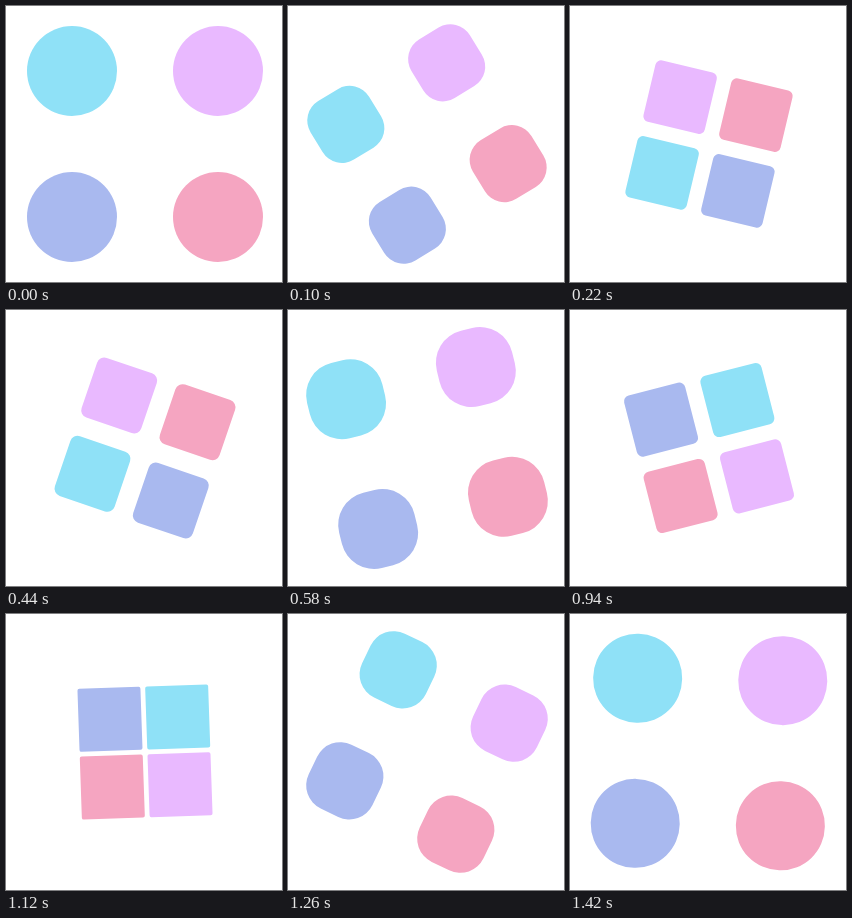
An HTML page with a canvas for the animation above (1.44 s loop, 276 by 276 pixels).

```html
<!DOCTYPE html>
<html lang="en">
<head>
<meta charset="utf-8">
<title>Four shapes loader</title>
<style>
  html, body { margin: 0; width: 100%; height: 100%; overflow: hidden; background: #fff; }
  canvas { display: block; }
</style>
</head>
<body>
<canvas id="stage" width="276" height="276"></canvas>
<script>
const ctx = document.getElementById('stage').getContext('2d');
const LOOP = 1440, STEP = 20, DELAY = 19, SWING = 725;
const shapes = [
  { x: -1, y: -1, color: '#8fe1f7' },
  { x: 1, y: -1, color: '#e9b9ff' },
  { x: -1, y: 1, color: '#a9b9ef' },
  { x: 1, y: 1, color: '#f5a5c1' },
];

const bezier = (a, b, u) => 3 * a * u * (1 - u) ** 2 + 3 * b * u * u * (1 - u) + u ** 3;

// cubic-bezier(.25, .1, .25, 1)
function ease(x) {
  let lo = 0, hi = 1;
  for (let i = 0; i < 30; i++) {
    const mid = (lo + hi) / 2;
    if (bezier(0.25, 0.25, mid) < x) lo = mid; else hi = mid;
  }
  return bezier(0.1, 1, lo);
}

function draw(time) {
  const t = Math.floor((time % LOOP) / STEP) * STEP;
  const phase = Math.max(0, (t - DELAY) / SWING);
  const half = (phase % 1) * 2;
  const fold = half < 1 ? ease(half) : 1 - ease(half - 1);
  const turn = phase < 1 ? -1 : 1;

  const offset = 73 - 40 * fold;
  const size = 63 + 27 * (1 - fold) ** 3.7;
  const radius = size * (0.5 - 0.48 * fold);

  ctx.clearRect(0, 0, 276, 276);
  ctx.save();
  ctx.translate(139, 138);
  ctx.rotate(turn * fold * Math.PI / 2);
  for (const { x, y, color } of shapes) {
    ctx.fillStyle = color;
    ctx.beginPath();
    ctx.roundRect(x * offset - size / 2, y * offset - size / 2, size, size, radius);
    ctx.fill();
  }
  ctx.restore();
}

function tick() {
  draw(performance.now());
  requestAnimationFrame(tick);
}
tick();
</script>
</body>
</html>
```
